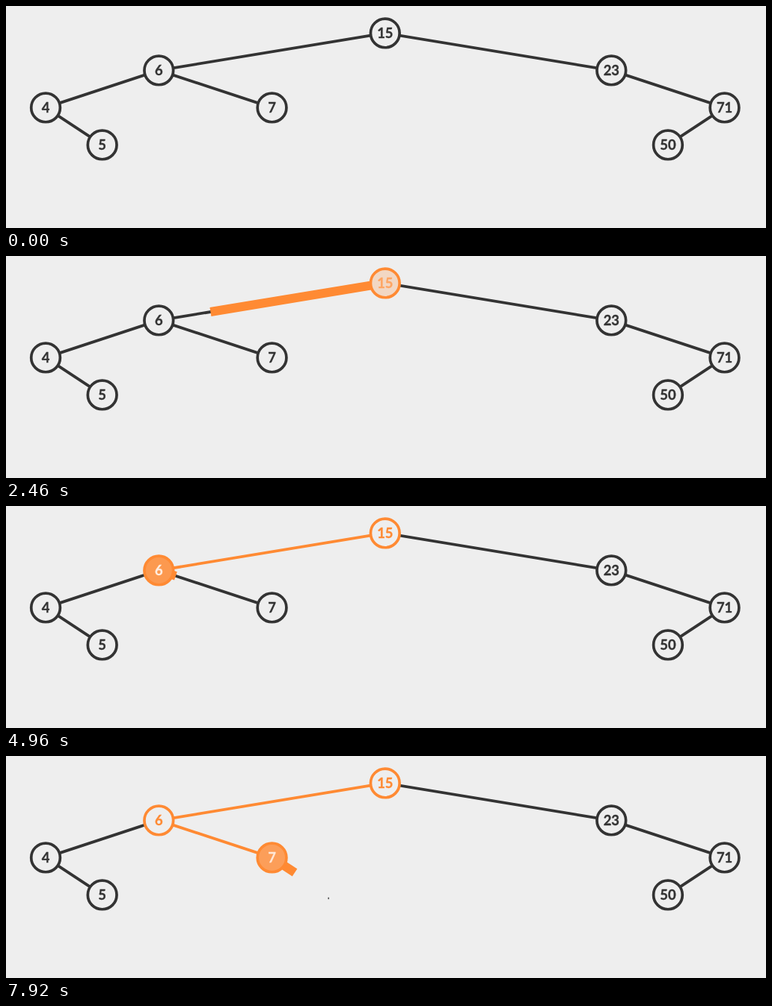
An HTML page for the animation above (8000 ms loop, 1016 by 298 pixels).

```html
<!DOCTYPE html>
<html lang="en">
<head>
<meta charset="utf-8">
<title>Tree insertion</title>
<style>
  html, body { margin: 0; width: 100%; height: 100%; overflow: hidden; background: #eee; }
  svg { display: block; width: 1016px; height: 298px; }
  line { stroke: #333; stroke-width: 3.8; }
  .trail { stroke: #ff8a33; stroke-width: 12; }
  .done { stroke: #ff8a33; }
  circle { fill: #eee; stroke: #333; stroke-width: 3.7; }
  text {
    font: bold 18.4px Lato, "Open Sans", sans-serif; text-anchor: middle;
    color: #333; fill: currentColor; stroke: currentColor; stroke-width: .35;
  }
</style>
</head>
<body>
<svg id="stage" viewBox="0 0 1016 298"></svg>
<script>
const LOOP = 8000, FIRST = 500, LAST = 7920;
const DELAY = 113, STEP = 1454;
const DARK = [51, 51, 51], ORANGE = [255, 138, 51], PALE = [238, 238, 238], WHITE = [255, 255, 255];

const stage = document.getElementById("stage");
function add(tag, attributes, content = "") {
  const node = document.createElementNS("http://www.w3.org/2000/svg", tag);
  for (const name in attributes) node.setAttribute(name, attributes[name]);
  node.textContent = content;
  return stage.appendChild(node);
}
const addLine = (a, b, style = "") => add("line", { x1: a.x, y1: a.y, x2: b.x, y2: b.y, class: style });

// Binary search tree: each level halves the horizontal offset
const root = { value: 15, x: 506.8, y: 36.4, level: 0 };
const vertices = [root];
function insert(value) {
  let parent = root, side;
  while (parent[side = value < parent.value ? "left" : "right"]) parent = parent[side];
  const shift = 302.5 / 2 ** parent.level;
  const child = {
    value, parent, level: parent.level + 1,
    x: parent.x + (side === "left" ? -shift : shift), y: parent.y + 50
  };
  parent[side] = child;
  return child;
}
[6, 23, 4, 7, 71, 5, 50].forEach(value => vertices.push(insert(value)));
const newcomer = insert(9);

for (const v of vertices) if (v.parent) v.edge = addLine(v.parent, v);

// The search visits every ancestor of the newcomer, from the root down
const route = [newcomer];
while (route[0].parent) route.unshift(route[0].parent);
const legs = route.slice(1).map((to, i) => ({ from: route[i], to, trail: addLine(route[i], to, "trail") }));

for (const v of vertices) {
  v.disc = add("circle", { cx: v.x, cy: v.y, r: 19.35 });
  v.label = add("text", { x: v.x, y: v.y + 6.6 }, v.value);
}
const seed = add("rect", { x: newcomer.x - .8, y: newcomer.y + 3.4, fill: "#555" });

const mix = (a, b, p) => a.map((v, i) => v + (b[i] - v) * p);
const css = color => `rgb(${color.map(Math.round)})`;
function ease(t) {
  t = Math.min(1, Math.max(0, t));
  const p = t < .5 ? 4 * t ** 3 : 1 - 4 * (1 - t) ** 3;
  return p > .998 ? 1 : p;
}

// Even steps light a vertex; odd steps fade it while a trail leaves it
function draw(ms) {
  const step = ms < FIRST ? 0 : (Math.min(ms, LAST) - DELAY) / STEP;
  legs.forEach(({ from, to, trail }, i) => {
    const on = ease(step - 2 * i), off = ease(step - 2 * i - 1);
    from.disc.style.fill = css(mix(mix(PALE, ORANGE, on), PALE, off));
    from.disc.style.stroke = css(mix(DARK, ORANGE, on));
    from.label.style.color = css(mix(mix(DARK, WHITE, on), ORANGE, off));

    // The trail to the newcomer runs at double speed
    const reach = to === newcomer ? Math.min(1, 2 * off) : off;
    trail.setAttribute("x2", from.x + (to.x - from.x) * reach);
    trail.setAttribute("y2", from.y + (to.y - from.y) * reach);
    trail.style.display = reach > 0 && reach < 1 ? "" : "none";
    to.edge?.classList.toggle("done", reach === 1);
  });
  const growth = ease(step - 5) * 5;
  seed.setAttribute("width", 1.6 * growth);
  seed.setAttribute("height", 2.4 * growth);
}

const began = performance.now();
function tick() {
  draw((performance.now() - began) % LOOP);
  requestAnimationFrame(tick);
}
tick();
</script>
</body>
</html>
```
